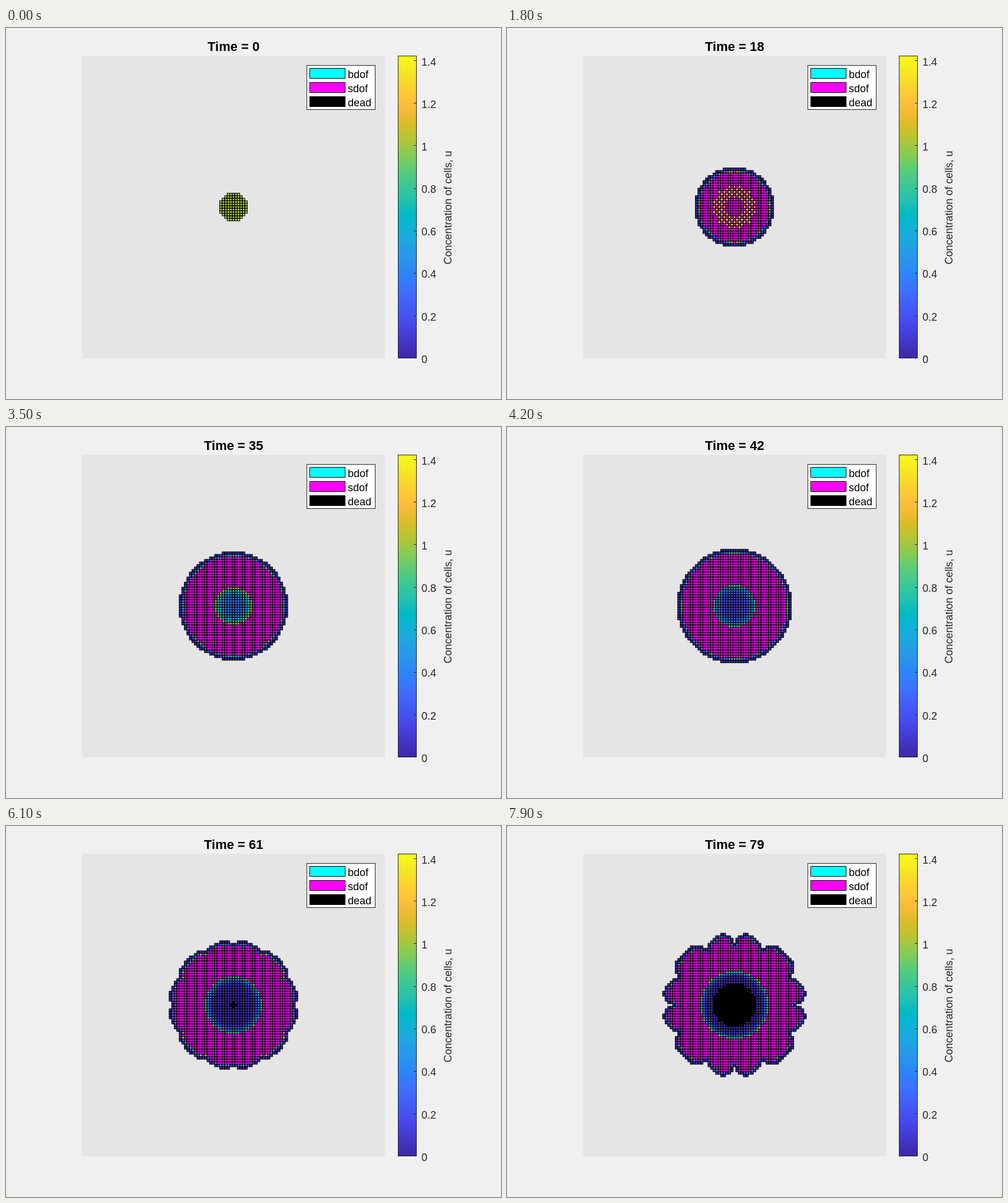
Write an HTML page with a canvas that moves like this. It is 840 px wide and 630 px high and loops after 8000 ms.

```html
<!DOCTYPE html>
<html lang="en">
<head>
<meta charset="utf-8">
<title>Cell growth</title>
<style>
html, body { margin: 0; width: 100%; height: 100%; overflow: hidden; background: #f0f0f0; }
canvas { display: block; }
</style>
</head>
<body>
<canvas id="stage" width="840" height="630"></canvas>
<script>
const ctx = document.getElementById('stage').getContext('2d');
const CX = 386, CY = 304, CELL = 513.45 / 120, MAX_U = 1.423;
const FONT = '"Liberation Sans", Arial, sans-serif';

// Piecewise linear curves: [x, y] knots
const PARULA = [[0, 0x3e26a8], [7, 0x4747eb], [14, 0x3e6fff], [17, 0x2f81fa], [21, 0x2797eb], [25, 0x1ca9df],
  [28, 0x08b5d0], [30, 0x02bac3], [33, 0x24c1ae], [35, 0x31c69f], [39, 0x57cc7a], [42, 0x81cc59], [46, 0xb9c431],
  [49, 0xdcbd29], [51, 0xf0ba36], [53, 0xfebe3c], [56, 0xfccf30], [59, 0xf5e327], [63, 0xf9fb15]];
const NOTCH = [[0, 5.5], [9, 9.8], [18, 15.7], [27, 19.8], [35, 21.42], [45, 23.1], [49, 23.56],
  [54, 24.1], [61, 24.2], [79, 24.3]];
const PETAL = [[50, 0], [54, .3], [61, 1.4], [79, 4.33]];
const CORE_START = [[0, 24], [4.5, 27], [7.3, 35], [9.6, 49], [11.4, 61], [13.5, 79], [15, 95]];

function segment(knots, x) {
  let k = 1;
  while (k < knots.length - 1 && x > knots[k][0]) k++;
  const [x0, a] = knots[k - 1], [x1, b] = knots[k];
  return [a, b, Math.min(1, Math.max(0, (x - x0) / (x1 - x0)))];
}

function curve(knots, x) {
  const [a, b, f] = segment(knots, x);
  return a + (b - a) * f;
}

function parula(u) {
  const [a, b, f] = segment(PARULA, u / MAX_U * 63);
  const mix = s => {
    const p = a >> s & 255, q = b >> s & 255;
    return Math.round(p + (q - p) * f);
  };
  return `rgb(${mix(16)},${mix(8)},${mix(0)})`;
}

// Twelve lobes, folded into one 45 degree wedge
function lobe(i, j) {
  const a = Math.abs(i), b = Math.abs(j);
  const deg = Math.atan2(Math.min(a, b), Math.max(a, b)) * 180 / Math.PI;
  if (deg < 27.5) return Math.sin(Math.PI * (deg / 27.5) ** .8);
  return Math.min(1, 1.5 * Math.sin(Math.PI * (deg - 27.5) / 35) ** .6);
}

function cellColor(i, j, t, depth) {
  if (t === 0) return parula(1);
  const r = Math.hypot(i, j);
  const age = t - curve(CORE_START, r);
  if (r < 15 && age >= 0) return age >= 36.2 ? '#000' : parula(1.05 * Math.exp(-.115 * age));
  const u = .22 * Math.max(0, depth) ** 3;
  if (u < 1.05) return parula(u);
  const crowded = t >= 12 && t <= 22 && r > 3.5 && r < 8.6 && (i + j) % 2 === 0;
  return crowded ? parula(1.34) : '#f0f';
}

function drawCells(t) {
  const base = curve(NOTCH, t), amp = curve(PETAL, t);
  const inside = (i, j) => base + amp * lobe(i, j) - Math.hypot(i, j);
  const cells = [];
  for (let j = -30; j <= 30; j++) for (let i = -30; i <= 30; i++) {
    const d = inside(i, j);
    if (d < 0) continue;
    const depth = Math.min(d, 1 + Math.min(inside(i + 1, j), inside(i - 1, j), inside(i, j + 1), inside(i, j - 1)));
    const rect = [CX + (i - .5) * CELL, CY + (j - .5) * CELL, CELL, CELL];
    cells.push(rect);
    ctx.fillStyle = cellColor(i, j, t, depth);
    ctx.fillRect(...rect);
  }
  ctx.strokeStyle = '#000';
  ctx.lineWidth = 1;
  for (const rect of cells) ctx.strokeRect(...rect);
}

function box(x, y, w, h, fill, line) {
  ctx.fillStyle = line;
  ctx.fillRect(x, y, w + 1, h + 1);
  ctx.fillStyle = fill;
  ctx.fillRect(x + 1, y + 1, w - 1, h - 1);
}

function text(s, x, y, color = '#262626', font = '18px', centered = false) {
  ctx.font = `${font} ${FONT}`;
  ctx.fillStyle = color;
  ctx.fillText(s, centered ? Math.round(x - ctx.measureText(s).width / 2) : x, y);
}

function drawColorbar() {
  box(665, 47, 31, 513, '#fff', '#262626');
  for (let y = 48; y < 560; y++) {
    ctx.fillStyle = parula((560 - y) / 513 * MAX_U);
    ctx.fillRect(666, y, 30, 1);
  }
  for (let k = 0; k <= 7; k++) {
    const y = 560.7 - k * 72.16;
    ctx.fillStyle = '#262626';
    ctx.fillRect(692, Math.floor(y), 5, 1);
    text(String(k / 5), 705, Math.round(y + 8.1));
  }
  ctx.save();
  ctx.translate(756, 304.5);
  ctx.rotate(-Math.PI / 2);
  text('Concentration of cells, u', 0, 0, '#262626', '18px', true);
  ctx.restore();
}

function drawLegend() {
  box(510, 63, 116, 75, '#fff', '#262626');
  [['bdof', '#0ff'], ['sdof', '#f0f'], ['dead', '#000']].forEach(([name, color], k) => {
    box(515, 68 + 24 * k, 60, 17, color, '#000');
    text(name, 580, 85 + 24 * k, '#000');
  });
}

function draw(t) {
  ctx.fillStyle = '#f0f0f0';
  ctx.fillRect(0, 0, 840, 630);
  ctx.fillStyle = '#e5e5e5';
  ctx.fillRect(129, 47, 514, 514);
  text(`Time = ${t}`, CX, 39, '#000', 'bold 22px', true);
  drawCells(t);
  drawColorbar();
  drawLegend();
}

let start, shown = -1;
function tick() {
  const now = performance.now();
  start ??= now;
  const t = Math.floor((now - start) % 8000 / 100);
  if (t !== shown) draw(shown = t);
  requestAnimationFrame(tick);
}
tick();
</script>
</body>
</html>
```
